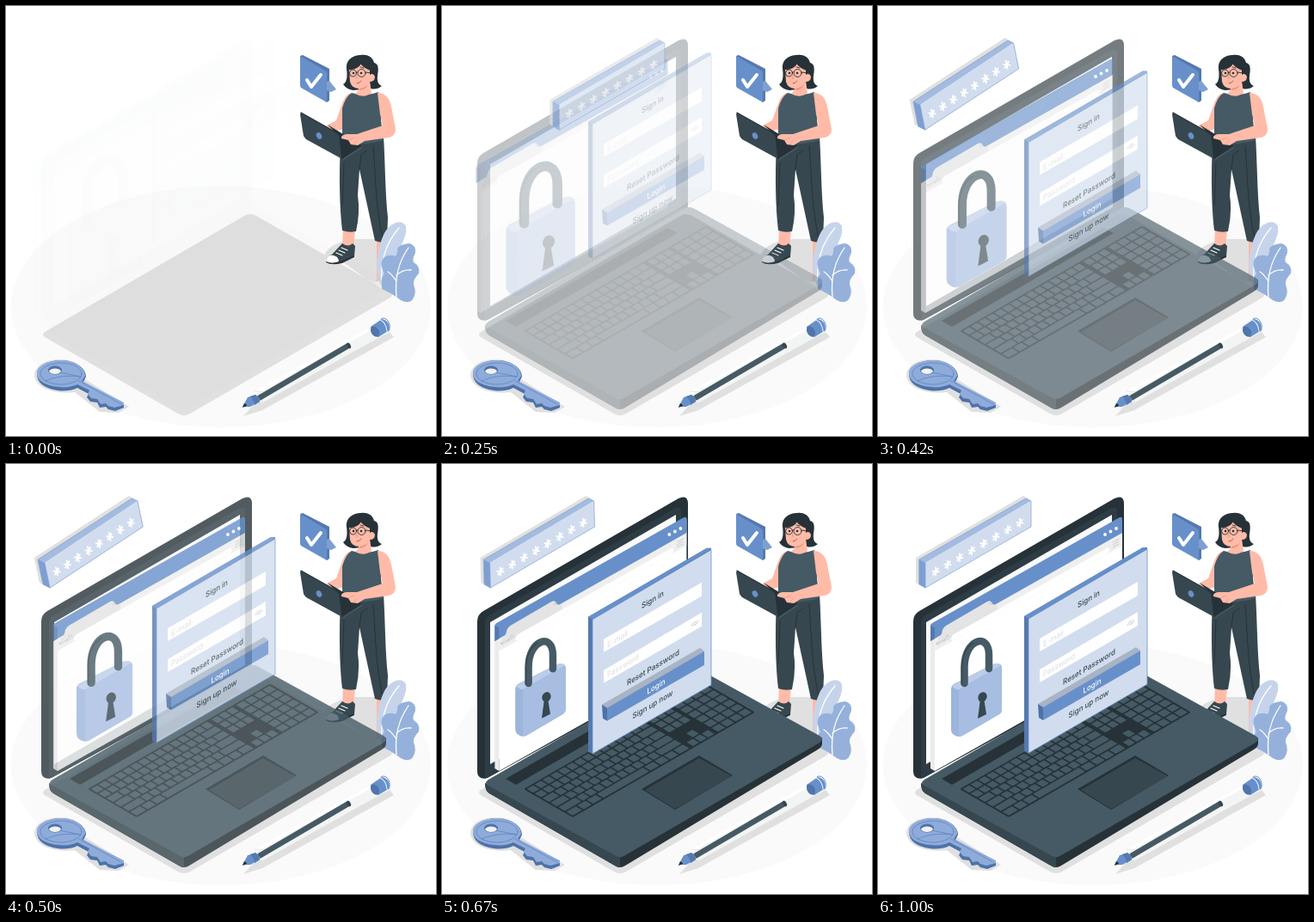
Animation of 500x500 px, one loop 1040 ms. Source, as an HTML page:

```html
<!DOCTYPE html>
<html lang="en">
<head>
<meta charset="utf-8">
<title>Sign in</title>
<style>
html, body { margin: 0; width: 100%; height: 100%; overflow: hidden; background: #fff; }
svg { display: block; width: 100vw; height: 100vh; }
text { font: 500 9.2px Inter, sans-serif; fill: #37474f; text-anchor: middle; }
.hint { font-weight: 400; fill: #dcdcdc; text-anchor: start; }
.line { fill: none; stroke-linecap: round; stroke-linejoin: round; }
</style>
</head>
<body>
<svg viewBox="0 0 500 500">
<ellipse cx="250" cy="349.500" rx="244" ry="140.500" fill="#fafafa"/>
<g fill="#e0e0e0">
  <path d="M45 379L277 244Q284 240 291 244L447 333Q451 336 447 339L214 474Q207 478 200 474L45 385Q41 382 45 379Z"/>
  <path d="M370 291C374 278 392 271 412 271H434L446 290L438 325L420 318L392 298Z"/>
  <path d="M276 477L292 459L446 379L451 385L298 470Z"/>
  <path d="M33 430C33 416 50 410 65 411C84 412 93 423 92 434L143 466L131 473L109 472L80 449C55 452 35 444 33 430Z"/>
</g>

<!-- key -->
<g>
  <path d="M36 428C36 419 49 412 64 412S93 420 93 431L90 437L137 462V467L127 471L119 469L116 466L109 467L106 461L98 460L94 455L96 451L83 444C75 448 66 448 60 447C45 445 36 438 36 428Z" fill="#4d72a8"/>
  <path d="M36 427C36 418 49 412 64 412S92 420 92 430L88 436L137 461V464L126 467L119 465L116 462L110 463L106 457L99 456L95 451L97 447L83 440C77 443 69 444 62 443C47 442 36 436 36 427Z" fill="#8eabda"/>
  <g class="line" stroke="#5f86c0">
    <ellipse cx="64" cy="427.500" rx="24" ry="12.500" stroke-width=".8"/>
    <path d="M62 426L87 431M85 436L134 463M46 436C58 431 70 429 86 431" stroke-width=".8"/>
  </g>
  <ellipse cx="57" cy="423.500" rx="8" ry="5" fill="#4d72a8"/>
  <path d="M50 425C51 421 62 420 64 425C61 429 53 429 50 425Z" fill="#f2f2f2"/>
</g>

<!-- pen -->
<g>
  <path d="M289 448L426 372L436 384L297 462Z" fill="#f3f5f4"/>
  <path d="M289 448L426 372L428 375L291 451Z" fill="#fff"/>
  <path d="M289 448L301 449L297 462" class="line" stroke="#e3e6e8"/>
  <path d="M294 456L398 395" stroke="#455a64" stroke-width="6.500" fill="none"/>
  <ellipse cx="398.500" cy="394.800" rx="2.200" ry="3.600" transform="rotate(-30 398.500 394.800)" fill="#37474f"/>
  <path d="M275 466L281 455L290 452Q295 455 295 460L284 466Z" fill="#6790cb"/>
  <path d="M284 454Q289 459 289 464L295 460Q295 455 290 452Z" fill="#5579ae"/>
  <path d="M275 467L277 462Q280 463 280 465Z" fill="#263238"/>
  <path d="M424 373L437 364Q446 365 446 377L433 385Q424 383 424 373Z" fill="#6790cb"/>
  <ellipse cx="429" cy="378.500" rx="4.500" ry="6.500" transform="rotate(-30 429 378.500)" fill="#5175ab"/>
  <path d="M436 364Q440 361 444 366Q448 372 445 378" class="line" stroke="#6790cb"/>
  <path d="M435 365Q442 368 443 378" class="line" stroke="#e4ecf7" stroke-width="1.200"/>
</g>

<!-- woman -->
<g>
  <path d="M431 270H443L440 322H431Z" fill="#ffbba8"/>
  <path d="M428 322L437 318L447 331L436 329Z" fill="#eee"/>
  <path d="M392 259H406L404 281L391 280Z" fill="#ffbba8"/>
  <path d="M391 276Q398 281 403 276L406 279L405 291L390 298Q378 302 372 297Q372 291 379 289Z" fill="#37474f"/>
  <path d="M372 295Q374 289 381 290Q387 292 387 297Q378 301 372 297Z" fill="#fff"/>
  <path d="M372 297Q380 301 391 296L405 290V292L391 299Q378 302 372 298Z" fill="#263238"/>
  <path d="M384 287L391 290M387 284L394 287M390 281L397 284" class="line" stroke="#fff" stroke-width="1.200"/>
  <path d="M389 160L439 151C441 185 441 220 444 246L443 274Q436 276 429 273L411 190L409 220Q412 240 407 262Q399 264 391 261C388 235 387 200 389 160Z" fill="#37474f"/>
  <path d="M427 163C430 205 430 235 438 270M411 190L413 173L420 168M393 182L391 232" class="line" stroke="#263238"/>
  <path d="M402 101C395 102 392 110 389 119L384 133L373 139L377 147L393 143Z" fill="#ffbba8"/>
  <path d="M402 101Q418 106 433 100L436 112V133L439 156Q416 163 391 159V119Q395 105 402 101Z" fill="#455a64"/>
  <path d="M374 138L392 149L414 163L391 178L386 150Z" fill="#263238"/>
  <path d="M391 178L414 163V165L391 180Z" fill="#455a64"/>
  <path d="M343 124L384 147Q387 149 388 152L391 178L349 155Q347 153 346 151L342 126Z" fill="#37474f"/>
  <path d="M343 124L384 147Q387 149 388 152L391 178" class="line" stroke="#263238" stroke-width="1.300"/>
  <ellipse cx="364" cy="151" rx="3" ry="4" transform="rotate(-30 364 151)" fill="#6790cb"/>
  <path d="M432 101C441 101 446 107 448 117L453 143Q453 151 445 153L417 157L409 162L401 161L398 156L390 154Q389 150 396 149L408 149L438 139L435 126Z" fill="#ffbba8"/>
  <path d="M398 156L405 153M404 161L408 157" class="line" stroke="#e9947f" stroke-width=".7"/>
  <path d="M396 73C395 62 404 57 413 57C422 56 427 61 428 66C434 67 433 75 432 81C431 89 434 92 437 93C432 97 428 97 424 96L404 98Q396 97 392 91Q398 88 396 73Z" fill="#263238"/>
  <path d="M409 90L423 87L425 101Q416 108 406 102L410 98Z" fill="#ffbba8"/>
  <path d="M399 74Q406 73 412 67Q417 73 423 74L423 80Q427 77 429 82Q429 88 423 88Q420 95 411 96Q402 96 400 88Z" fill="#ffbba8"/>
  <path d="M399 74Q408 75 414 66Q418 74 424 75L426 66L412 60L400 65Z" fill="#263238"/>
  <path d="M411 96Q418 95 421 91Q419 97 411 98Z" fill="#ed957f"/>
  <g class="line" stroke="#263238" stroke-width=".9">
    <circle cx="403.500" cy="78" r="4"/><circle cx="413.500" cy="78" r="4.500"/>
    <path d="M418 77L425 78M407 77L409 77M401 72L405 71M412 71L416 72"/>
    <path d="M409 78L407 84L409 84" stroke="#e9947f"/>
    <path d="M408 90Q411 90 413 87" stroke="#b3503f"/>
  </g>
  <circle cx="404" cy="78" r="1.300" fill="#263238"/><circle cx="413" cy="78" r="1.300" fill="#263238"/>
</g>

<!-- speech bubble -->
<g>
  <path d="M342 58L345 57L376 73V110L373 112L370 109Z" fill="#5579ae"/>
  <path d="M372 88L376 87L384 97L378 100L372 98Z" fill="#7f9fd2"/>
  <path d="M342 58L371 75Q373 76 373 78V112L343 95Q342 94 342 92Z" fill="#6790cb"/>
  <path d="M350 86L355 94L366 80" class="line" stroke="#fff" stroke-width="4"/>
</g>

<!-- leaves -->
<g>
  <path d="M437 326C428 312 431 282 440 264C447 251 461 247 465 256C467 267 459 277 455 290L443 326Z" fill="#c6d4eb"/>
  <path d="M437 324C435 300 441 276 457 258" class="line" stroke="#fff" stroke-width="1.300"/>
  <path d="M437 326Q435 318 440 311Q433 298 440 292Q446 288 453 291Q456 286 455 282Q458 277 469 276Q477 278 476 287Q472 295 474 298Q482 303 480 311Q473 318 474 324Q478 333 473 341Q468 347 459 342Q447 333 437 329Z" fill="#95b1db"/>
  <path d="M454 338C452 318 456 298 468 281M454 313Q462 306 471 307M454 320Q448 311 444 309" class="line" stroke="#fff" stroke-width="1.300"/>
</g>

<g id="laptop">
  <path d="M41 183Q41 175 48 171L275 40Q286 35 286 46V237L53 365Q41 368 41 357Z" fill="#263238"/>
  <path d="M50 185Q50 179 55 176L270 52Q278 48 278 56V237L50 366Z" fill="#2e3d45"/>
  <path d="M56 184L272 59V224L56 349Z" fill="#fafafa"/>
  <path d="M50 371L207 457L442 318V325Q442 329 437 332L213 467Q207 471 201 467L55 383Q50 380 50 371Z" fill="#263238"/>
  <path d="M50 371L207 457V469Q204 469 201 467L55 383Q50 380 50 371Z" fill="#37474f"/>
  <path d="M54 367L281 236Q288 232 294 236L439 316Q445 320 439 324L213 455Q207 459 201 455L54 374Q48 371 54 367Z" fill="#455a64"/>
  <path d="M74 366L262 258L274 264L86 373Z" fill="#263238"/>
  <path d="M232 378L299 339L338 362L271 402Z" fill="#263238"/>
  <path d="M236 379L299 342L337 363L271 401Z" fill="#37474f"/>
  <g id="keys" transform="matrix(1 -.577 1 .577 95 378)">
    <rect width="212" height="57" rx="2" fill="#263238"/>
  </g>
</g>

<g id="browser">
  <path d="M61 187L66 186V357L61 354Z" fill="#ebebeb"/>
  <path d="M66 187L284 64V234L66 357Z" fill="#fff"/>
  <path d="M65 202L284 79V95L65 218Z" fill="#efefef"/>
  <path d="M61 188Q61 186 63 185L281 62Q284 61 284 64V80L137 163L66 203L61 206Z" fill="#6790cb"/>
  <path d="M61 188L66 190V203L61 206Z" fill="#5579ae"/>
  <path d="M70 202Q74 200 75 193Q76 190 79 188L127 160Q131 158 132 161Q134 165 139 163L139 172L70 211Z" fill="#e4e4e4"/>
  <path d="M88 198L266 98Q269 97 269 100Q269 103 266 105L88 205Q85 206 85 203Q85 200 88 198Z" fill="#fff"/>
  <path d="M68 209L72 207M69 207L68 209L70 210M74 206L78 204M77 203L78 204L77 206M81 203A2 2 0 1 1 83 201M130 162L133 163M133 161L130 164M273 91L280 87M273 94L280 90M273 97L280 93" class="line" stroke="#c7c7c7" stroke-width=".9"/>
  <g fill="#fff"><circle cx="264" cy="82" r="1.900"/><circle cx="270.500" cy="78.500" r="1.900"/><circle cx="277" cy="75" r="1.900"/></g>
</g>

<g id="lock">
  <path d="M85 261Q85 258 88 256L133 233Q144 230 144 237V286Q144 289 141 291L98 316Q94 318 90 316L87 314Q85 312 85 309Z" fill="#9cb5dd"/>
  <path d="M86 258L133 233Q142 230 143 235L95 262Q90 263 86 258Z" fill="#bccdea"/>
  <path d="M94 265Q94 262 97 260L139 236Q144 233 144 238V286Q144 289 141 291L98 316Q94 318 94 314Z" fill="#a7bee2"/>
  <path d="M100.500 255V236C100.500 204 129 195 129 222V238" class="line" stroke="#455a64" stroke-width="8.500"/>
  <path d="M97.500 256V235C98 223 103 212 111 208" class="line" stroke="#37474f" stroke-width="1.500"/>
  <ellipse cx="121.500" cy="271" rx="5" ry="6" transform="rotate(25 121.500 271)" fill="#37474f"/>
  <path d="M119 273L116 296L126 291L123 272Z" fill="#37474f"/>
</g>

<g id="panel">
  <path d="M170 177L308 97L313 97V101L175 181V336L170 334Z" fill="#5579ae"/>
  <path d="M170 177L308 97L313 98L175 180Z" fill="#6790cb"/>
  <path d="M175 180L313 99V256L175 336Z" fill="#d1ddee"/>
  <path d="M175 336V180L313 99V256Z" class="line" stroke="#6790cb" stroke-width=".8"/>
  <path d="M188 203L302 137V153L188 218ZM188 239L302 172V188L188 254Z" fill="#fff"/>
  <g class="line" stroke="#d4d4d4" stroke-width=".8"><path d="M290 187Q293 181 298 182Q296 188 290 187Z"/><circle cx="294" cy="184.500" r="1.500"/></g>
  <path d="M186 279L300 213L305 217L192 284Z" fill="#a8b3c4"/>
  <path d="M186 279L192 283V298L187 295Z" fill="#4d72a8"/>
  <path d="M192 283L305 217V233L192 298Z" fill="#6790cb"/>
</g>

<g id="bar">
  <path d="M44 109L169 37L174 40L50 112V141L44 138Z" fill="#e0e0e0"/>
  <path d="M48 111L172 40L178 43L55 115V144L48 140Z" fill="#a4bbe0"/>
  <path d="M48 111L55 115V144L48 140Z" fill="#7f9fd2"/>
  <path d="M55 115L178 43V73L55 144Z" fill="#d1ddee"/>
  <path d="M48 111L172 40L178 43V73L55 144L48 140ZM55 144V115" class="line" stroke="#7f9fd2" stroke-width=".7"/>
</g>
</svg>
<script>
const $ = id => document.getElementById(id);
const svgNS = "http://www.w3.org/2000/svg";
function add(parent, tag, attrs, label) {
  const node = document.createElementNS(svgNS, tag);
  for (const name in attrs) node.setAttribute(name, attrs[name]);
  if (label) node.textContent = label;
  parent.append(node);
}

// Keyboard: each row has a first key, some unit keys and a last key filling 15 units
const unit = 9.15, rowHeight = 9.2;
const key = (u, row, width) => add($("keys"), "rect", {
  x: u + 0.8, y: 1.6 + row * rowHeight, width: width - 1.6, height: rowHeight - 1.6, rx: 0.8, fill: "#455a64"
});
[[1, 13], [1, 12], [1.5, 12], [1.8, 11], [2.3, 10]].forEach(([first, count], row) => {
  key(1, row, first * unit);
  for (let i = 0; i < count; i++) key(1 + (first + i) * unit, row, unit);
  key(1 + (first + count) * unit, row, (15 - first - count) * unit);
});
let u = 1;
for (const size of [1.4, 1.2, 1.3, 6, 1.3, 1.2, 1.2, 1.4]) {
  key(u, 5, size * unit);
  u += size * unit;
}
for (let col = 0; col < 3; col++)
  for (const row of [0, 1, 2, 5]) key(141 + col * 8.8, row, 8.8);
key(149.8, 4, 8.8);
for (let col = 0; col < 4; col++)
  for (let row = 0; row < 6; row++) key(170 + col * 10.2, row, 10.2);

function label(x, y, value, attrs) {
  add($("panel"), "text", { transform: `matrix(.866 -.52 0 1 ${x} ${y})`, ...attrs }, value);
}
label(245, 160, "Sign in");
label(192, 213, "E-mail", { class: "hint" });
label(192, 248, "Password", { class: "hint" });
label(245.5, 239, "Reset Password");
label(249, 261, "Login", { style: "fill:#fff" });
label(245, 282, "Sign up now");

for (let i = 0; i < 8; i++)
  add($("bar"), "path", {
    d: "M0-4.500V4.500M-3.600-.300L3.600.300M-2.800 3.600L2.800-3.600",
    transform: `translate(${67 + 14 * i} ${125 - 8.1 * i})`,
    class: "line", stroke: "#fff", "stroke-width": 1.9
  });

const cubic = (s, a, b) => 3 * (1 - s) * (1 - s) * s * a + 3 * (1 - s) * s * s * b + s * s * s;

// Overshooting cubic-bezier(.36, -.01, .5, 1.38)
function ease(x) {
  if (x >= 1) return 1;
  let low = 0, high = 1;
  for (let i = 0; i < 24; i++) {
    const mid = (low + high) / 2;
    if (cubic(mid, 0.36, 0.5) < x) low = mid; else high = mid;
  }
  return cubic(low, -0.01, 1.38);
}

function place(id, opacity, transform) {
  $(id).setAttribute("opacity", Math.max(0, Math.min(1, opacity)));
  $(id).setAttribute("transform", transform);
}

const loop = 1040, steps = 25;

function draw() {
  const time = performance.now() % loop;
  const step = Math.min(steps - 1, Math.floor((time + 5) / loop * steps));
  const x = Math.min(1, (step + 0.7) / 24);
  const p = ease(x), rest = 1 - p;

  place("laptop", p, "");
  place("browser", p, `translate(${-30 * rest} 0)`);
  place("lock", p, `translate(114.5 261) scale(${1 + rest / 2}) translate(-114.5 -261)`);
  place("panel", p, `translate(0 ${-59 * rest})`);

  // The bar rushes in from the right, then sways upright
  const rush = ease(x / 0.6);
  const skew = x < 0.6 ? -20 + 30 * rush
    : x < 0.8 ? 10 - 12 * ease((x - 0.6) / 0.2)
    : -2 + 2 * ease((x - 0.8) / 0.2);
  place("bar", rush, `translate(${111 + 250 * (1 - rush)} 91) skewX(${skew}) translate(-111 -91)`);

  requestAnimationFrame(draw);
}
draw();
</script>
</body>
</html>
```
